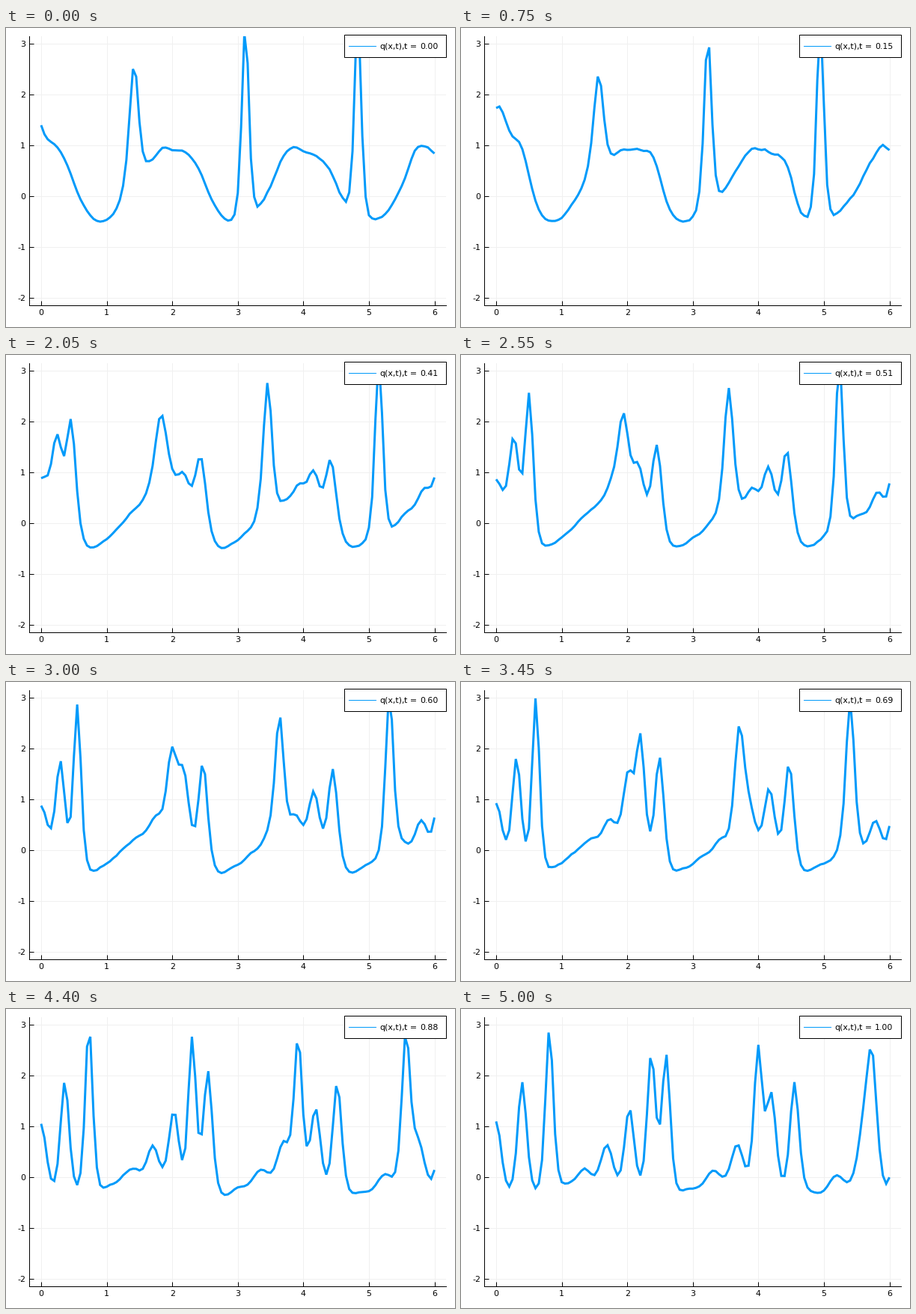
A matplotlib script that plays this animation: 600 px wide and 400 px high, repeating every 5050 ms.

```python
import numpy as np
import matplotlib.pyplot as plt
from matplotlib.animation import FuncAnimation
from matplotlib.patches import Rectangle

# A train of solitons riding a rolling background, evolved by
# q_t + SPEED * (q q_x + DELTA^2 q_xxx) = 0 on a periodic domain.
W, H, DPI = 600, 400, 100
FRAMES, INTERVAL = 101, 50
BLUE = "#009afa"
SPEED, DELTA = 0.885, 0.04
START, PERIOD, CELLS = -1.0, 8.0, 320
SUBSTEPS = 10

# One roll of the background (period 2): position, height
ROLL = [(0, 0.91), (0.2, 0.87), (0.4, 0.55), (0.6, -0.06), (0.8, -0.445),
        (1.05, -0.47), (1.25, -0.35), (1.5, 0.2), (1.7, 0.8), (1.85, 0.97)]
# Local swells of the background: position, height, width
SWELLS = [(0.25, 0.12, 0.17), (1.32, 0.38, 0.19), (1.72, -0.1, 0.1),
          (4.2, -0.08, 0.18), (5.72, 0.1, 0.1), (6.05, -0.09, 0.1)]
# Solitons: position, height; the height sets the width
SOLITONS = [(-0.12, 0.85), (1.417, 2.33), (3.115, 3.85), (4.831, 4.0), (6.53, 2.9)]

k = 2 * np.pi / PERIOD * np.arange(CELLS // 2 + 1)
keep = k < 62


def background(x):
    """Smooth periodic curve through the points of ROLL."""
    px, py = np.array(ROLL).T
    px = np.concatenate([px - 2, px, px + 2])
    py = np.tile(py, 3)
    slope = np.gradient(py, px)
    x = x % 2
    i = np.searchsorted(px, x, side="right") - 1
    h = px[i + 1] - px[i]
    s = (x - px[i]) / h
    rise = s * s * (3 - 2 * s)
    bend = s * (1 - s) * (slope[i] * (1 - s) - slope[i + 1] * s)
    return py[i] + (py[i + 1] - py[i]) * rise + h * bend


def first_wave(x):
    def offset(center):
        return (x - center + PERIOD / 2) % PERIOD - PERIOD / 2

    q = background(x)
    for center, height, width in SWELLS:
        q += height * np.exp(-(offset(center) / width) ** 2)
    for center, height in SOLITONS:
        q += height / np.cosh(np.sqrt(height / 12) / DELTA * offset(center)) ** 2
    return q


def advect(v):
    q = np.fft.irfft(v, CELLS)
    return -0.5j * SPEED * k * keep * np.fft.rfft(q * q)


def evolve(q):
    """Fourth-order steps with the dispersion handled exactly."""
    dt = 0.01 / SUBSTEPS
    half = np.exp(0.5j * SPEED * DELTA ** 2 * k ** 3 * dt)
    full = half * half
    v = np.fft.rfft(q) * keep
    first = round(-START * CELLS / PERIOD)
    waves = []
    for _ in range(FRAMES):
        waves.append(np.fft.irfft(v, CELLS)[first:first + 241:2])
        for _ in range(SUBSTEPS):
            a = dt * advect(v)
            b = dt * advect(half * (v + a / 2))
            c = dt * advect(half * v + b / 2)
            d = dt * advect(full * v + half * c)
            v = full * v + (full * a + 2 * half * (b + c) + d) / 6
    return waves


def pt(px):
    return px * 72 / DPI


plt.rcParams["font.family"] = "DejaVu Sans"
curves = evolve(first_wave(START + PERIOD / CELLS * np.arange(CELLS)))

fig = plt.figure(figsize=(W / DPI, H / DPI), dpi=DPI, facecolor="white")
left, right, top, bottom = 31.2, 588.3, 11.3, 371.1
ax = fig.add_axes([left / W, 1 - bottom / H, (right - left) / W, (bottom - top) / H])
ax.set_xlim(-0.18, 6.18)
ax.set_ylim(-2.15, 3.15)
ax.set_xticks(range(7), [str(n) for n in range(7)])
ax.set_yticks(range(-2, 4), [str(n) for n in range(-2, 4)])
ax.tick_params(direction="in", length=pt(6), width=pt(1), pad=pt(5), labelsize=pt(11))
ax.grid(color="#f0f0f0", linewidth=pt(1))
ax.set_axisbelow(True)
for side in ("top", "right"):
    ax.spines[side].set_visible(False)
for side in ("left", "bottom"):
    ax.spines[side].set_linewidth(pt(1))

wave, = ax.plot(np.linspace(0, 6, 121), curves[0], color=BLUE, linewidth=pt(3),
                solid_joinstyle="miter", solid_capstyle="butt")

# Legend layer in pixel coordinates
key = fig.add_axes([0, 0, 1, 1], zorder=5)
key.set_xlim(0, W)
key.set_ylim(H, 0)
key.axis("off")
key.add_patch(Rectangle((451.5, 8.5), 136.8, 30, facecolor="white",
                        edgecolor="black", linewidth=pt(1)))
key.plot([458, 494], [23.5, 23.5], color=BLUE, linewidth=pt(1))


def legend_text(x, text, align="left"):
    return key.text(x, 27.6, text, fontsize=pt(11), ha=align, va="baseline")


legend_text(499.3, "q(x,t),")
legend_text(532.5, "t =")
clock = legend_text(577.3, "", "right")


def draw(i):
    wave.set_ydata(curves[i])
    clock.set_text(f"{i / 100:.2f}")
    return wave, clock


anim = FuncAnimation(fig, draw, frames=FRAMES, interval=INTERVAL,
                     repeat=True, repeat_delay=0)
plt.show()
```
